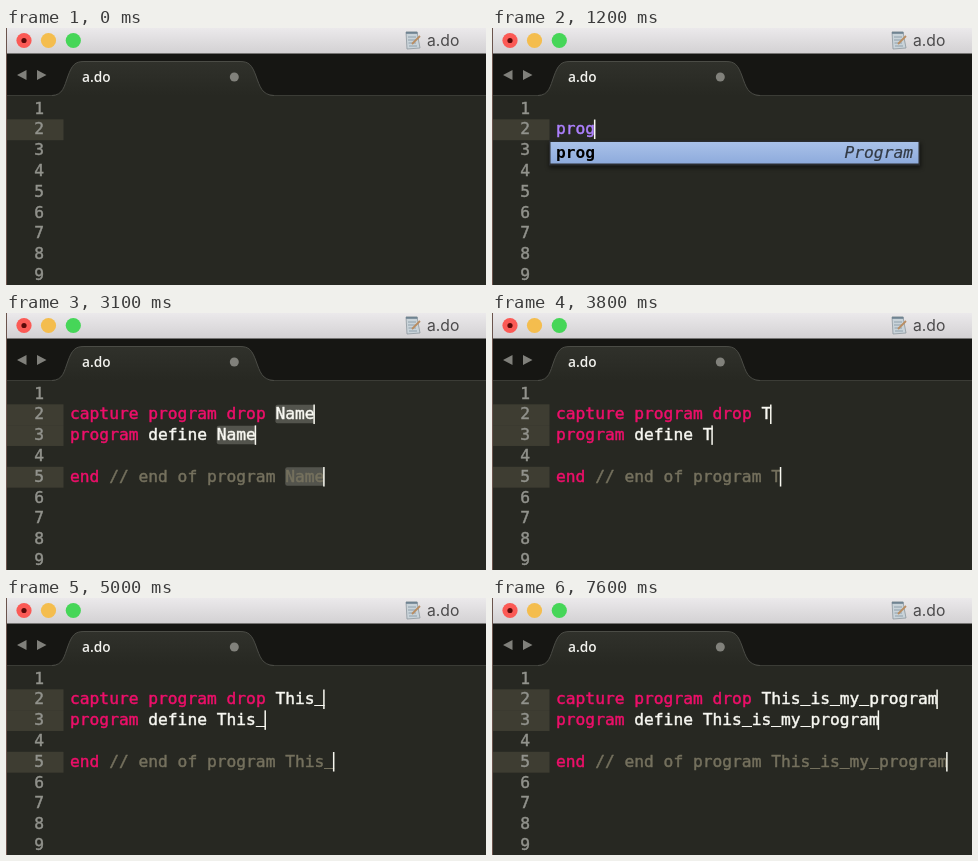
An HTML page for the animation above (7700 ms loop, 480 by 257 pixels).

```html
<!DOCTYPE html>
<html lang="en">
<head>
<meta charset="utf-8">
<title>Snippet typing</title>
<style>
  html, body { margin: 0; width: 100%; height: 100%; overflow: hidden; background: #272822; }
  svg { display: block; width: 480px; height: 257px; }
  text { white-space: pre; }
  .code text {
    font: 16.25px "DejaVu Sans Mono", monospace;
    color: #f8f8f2; fill: currentColor; stroke: currentColor; stroke-width: .45px;
  }
  .code .key { color: #ee0f6a; }
  .code .note { color: #75715e; }
  .code .typed { color: #ae81ff; }
  .code .num { color: #92938d; text-anchor: end; }
  .code .match { font-weight: bold; color: #000; stroke: none; }
  .code .hint { font-style: italic; color: #333a45; text-anchor: end; stroke-width: .2px; }
  .raised { baseline-shift: 1.8px; }
</style>
</head>
<body>
<svg viewBox="0 0 480 257">
  <defs>
    <linearGradient id="bar" x2="0" y2="1">
      <stop stop-color="#ebe9eb"/><stop offset="1" stop-color="#d3d1d3"/>
    </linearGradient>
    <linearGradient id="tab" x2="0" y2="1">
      <stop stop-color="#30312b"/><stop offset="1" stop-color="#272822"/>
    </linearGradient>
    <linearGradient id="row" x2="0" y2="1">
      <stop stop-color="#a9c1e9"/><stop offset="1" stop-color="#8eabdc"/>
    </linearGradient>
    <filter id="soft" x="-5%" y="-40%" width="110%" height="200%">
      <feGaussianBlur stdDeviation="2"/>
    </filter>
  </defs>

  <rect width="480" height="257" fill="#272822"/>
  <rect y="25" width="480" height="42" fill="#161613"/>
  <path d="M0 67.5H480" stroke="#3b3c36"/>
  <path d="M46 68C57 67 58 59 62 48C66 37 69 33.500 78 33.500H234C243 33.500 246 37 250 48C254 59 256 67 268 68Z" fill="url(#tab)"/>
  <path d="M46 67.500C57 67 58 59 62 48C66 37 69 33.500 78 33.500H234C243 33.500 246 37 250 48C254 59 256 67 268 67.500" fill="none" stroke="#4b4c46"/>
  <path d="M20.500 42V52L11 47ZM31 42V52L40.500 47Z" fill="#80807b"/>
  <text x="76" y="53.700" fill="#f2f2ee" style="font:600 13.700px 'Open Sans',sans-serif">a.do</text>
  <circle cx="228.300" cy="49" r="4.500" fill="#81817b"/>

  <rect width="480" height="25.500" fill="url(#bar)"/>
  <circle cx="18" cy="12.500" r="7.600" fill="#fb5a55"/>
  <circle cx="18" cy="12.500" r="2.600" fill="#5c0a08"/>
  <circle cx="42.500" cy="12.500" r="7.600" fill="#f4bd4e"/>
  <circle cx="67.300" cy="12.500" r="7.600" fill="#46d658"/>
  <g>
    <path d="M400 4H411L414 20L401 21Z" fill="#c9d3d9" stroke="#8d979d" stroke-width=".8"/>
    <path d="M400 4.800H411.500" stroke="#6f8391" stroke-width="2"/>
    <path d="M402 9H410M402 12H410M402.500 15H410M403 18H411" stroke="#8fa0ab" stroke-width="1"/>
    <path d="M406 16L414 8" stroke="#b98d62" stroke-width="1.800"/>
  </g>
  <text x="421" y="18" fill="#4b4a4b" style="font:15.700px Inter,sans-serif">a.do</text>

  <g class="code" id="code"></g>
  <rect width="1" height="257" fill="#6b544d"/>
</svg>
<script>
const LOOP = 7700, LEFT = 64, CELL = 9.783, LINE = 20.83;
const SNIPPET_AT = 2000;
const WORD = 'prog', WORD_TIMES = [400, 600, 800, 1000];
const NAME = 'This_is_my_program';
const NAME_TIMES = [3300, 4000, 4200, 4500, 4800, 5200, 5400, 5600, 5900,
  6200, 6500, 6700, 6800, 6900, 7000, 7200, 7300, 7500];

const code = document.getElementById('code');
const baseline = line => 85.5 + LINE * (line - 1);
const column = n => LEFT + CELL * n;

function add(parent, tag, attrs, content = '') {
  const node = document.createElementNS('http://www.w3.org/2000/svg', tag);
  for (const key in attrs) node.setAttribute(key, attrs[key]);
  node.textContent = content;
  return parent.appendChild(node);
}
const group = () => add(code, 'g', {});
const write = (parent, x, line, cls, content) =>
  add(parent, 'text', { x, y: baseline(line), class: cls }, content);
const band = (parent, line) => add(parent, 'rect',
  { y: baseline(line) - 15, width: 57.5, height: LINE, fill: '#3e3d32' });
const makeCaret = (parent, line) => add(parent, 'rect',
  { y: baseline(line) - 14.8, width: 1.5, height: 19.5, fill: '#f8f8f0' });
const moveCaret = (caret, col) => caret.setAttribute('x', column(col) - 1.2);
const show = (node, on) => node.setAttribute('visibility', on ? 'visible' : 'hidden');

// Underscores sit closer to the baseline than the font draws them.
function setName(label, name) {
  label.textContent = '';
  for (const part of name.split(/(_)/))
    add(label, 'tspan', { class: part === '_' ? 'raised' : '' }, part);
}

band(code, 2);
const snippet = group();
band(snippet, 3);
band(snippet, 5);
for (let n = 1; n <= 9; n++) write(code, 38, n, 'num', n);

const typing = group();
const typed = write(typing, LEFT, 2, 'typed', '');
const typingCaret = makeCaret(typing, 2);
const popup = group();
add(popup, 'rect', { x: 57, y: 115, width: 372, height: 25, fill: '#000', opacity: .5, filter: 'url(#soft)' });
add(popup, 'rect', { x: 57, y: 112.5, width: 371, height: 25, fill: '#2b2d30' });
add(popup, 'rect', { x: 58.5, y: 114, width: 368, height: 21.5, fill: 'url(#row)' });
add(popup, 'text', { x: LEFT, y: 130, class: 'match' }, WORD);
add(popup, 'text', { x: 421, y: 130, class: 'hint' }, 'Program');

// Each field mirrors the name being typed.
const fields = [[2, 21, ''], [3, 15, ''], [5, 22, 'note']].map(([line, col, cls]) => ({
  col,
  mark: add(snippet, 'rect', { x: column(col), y: baseline(line) - 14.5,
    width: CELL * 4, height: 18.5, rx: 2, fill: '#53544d' }),
  label: write(snippet, column(col), line, cls, ''),
  caret: makeCaret(snippet, line)
}));
write(snippet, LEFT, 2, 'key', 'capture program drop');
write(snippet, LEFT, 3, 'key', 'program');
write(snippet, column(8), 3, '', 'define');
write(snippet, LEFT, 5, 'key', 'end');
write(snippet, column(4), 5, 'note', '// end of program');

const countAt = (times, t) => times.filter(at => at <= t).length;

function draw(t) {
  const expanded = t >= SNIPPET_AT;
  const letters = countAt(WORD_TIMES, t);
  show(typing, !expanded && letters);
  show(popup, !expanded && letters);
  show(snippet, expanded);
  typed.textContent = WORD.slice(0, letters);
  moveCaret(typingCaret, letters);

  const count = countAt(NAME_TIMES, t);
  const name = count ? NAME.slice(0, count) : 'Name';
  for (const { col, mark, label, caret } of fields) {
    show(mark, expanded && !count);
    setName(label, name);
    moveCaret(caret, col + name.length);
  }
}

const start = performance.now();
function frame() {
  draw((performance.now() - start) % LOOP);
  requestAnimationFrame(frame);
}
frame();
</script>
</body>
</html>
```
